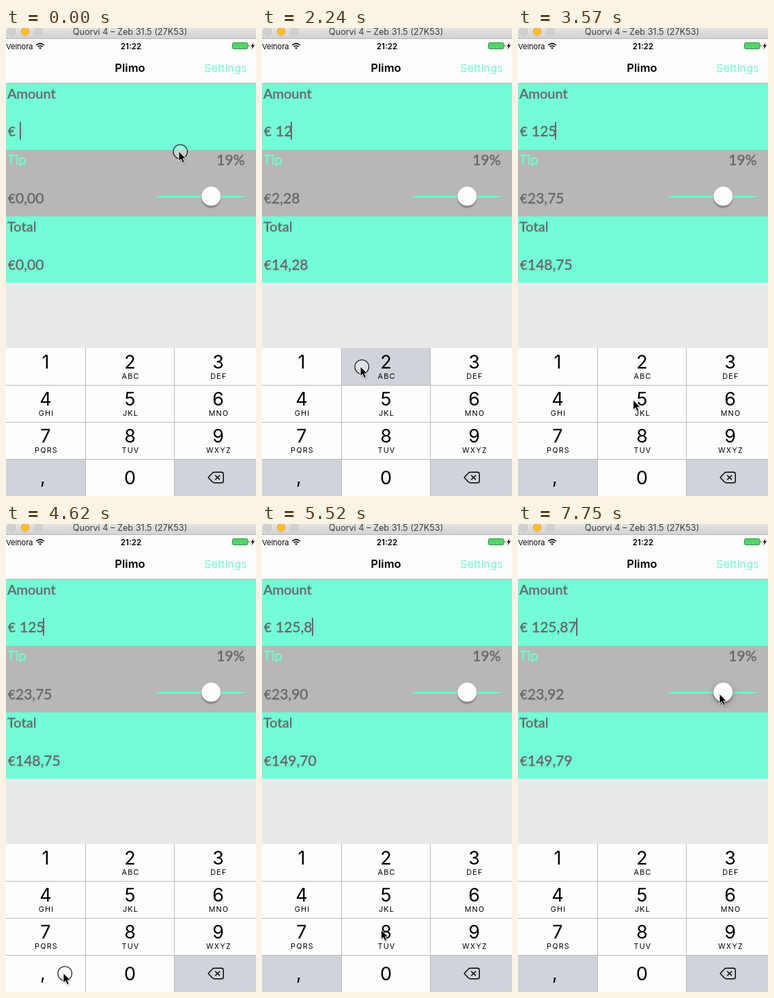
Write an HTML page that moves like this. It is 366 px wide and 683 px high and loops after 8 s.

```html
<!DOCTYPE html>
<html lang="en">
<head>
<meta charset="utf-8">
<title>Tip calculator</title>
<style>
  html, body { margin: 0; width: 100%; height: 100%; overflow: hidden; background: #e9e9e9; }
  svg { display: block; font-family: Inter, "Liberation Sans", sans-serif; }
  .form { font-family: Lato, "Open Sans", sans-serif; font-size: 21px; fill: #666; stroke: #666; stroke-width: .4; }
  .label { font-size: 20px; }
  .accent { fill: #73fcd6; stroke: #73fcd6; }
  .euro { font-size: 18.5px; }
  .digit { font-size: 27px; text-anchor: middle; }
  .letters { font-size: 10.8px; letter-spacing: 1.2px; text-anchor: middle; }
  .mid { text-anchor: middle; }
  .end { text-anchor: end; }
</style>
</head>
<body>
<svg id="stage" width="366" height="683" viewBox="0 0 366 683">
  <defs>
    <linearGradient id="chrome" x2="0" y2="1">
      <stop stop-color="#e4e4e4"/><stop offset="1" stop-color="#d2d2d2"/>
    </linearGradient>
    <filter id="soft" x="-50%" y="-50%" width="200%" height="200%"><feGaussianBlur stdDeviation="1.3"/></filter>
    <filter id="wide" x="-80%" y="-80%" width="260%" height="260%"><feGaussianBlur stdDeviation="4"/></filter>
  </defs>

  <!-- window bar -->
  <rect width="366" height="15" fill="url(#chrome)"/>
  <rect y="15" width="366" height="1" fill="#b3b3b3"/>
  <g stroke-width=".8">
    <circle cx="8" cy="5" r="5.8" fill="#d0d0d0" stroke="#bdbdbd"/>
    <circle cx="28" cy="5" r="5.8" fill="#fdbc2e" stroke="#e0a12b"/>
    <circle cx="47.5" cy="5" r="5.8" fill="#d0d0d0" stroke="#bdbdbd"/>
  </g>
  <text class="mid" x="181.5" y="10" font-size="12.7" fill="#3c3c3c">Quorvi 4 – Zeb 31.5 (27K53)</text>

  <!-- status and navigation -->
  <rect y="16" width="366" height="64" fill="#fdfdfd"/>
  <rect y="80" width="366" height="1" fill="#b5b5b5"/>
  <text x="0" y="30.5" font-size="11">Velnora</text>
  <g fill="none" stroke="#000" stroke-width="1.7">
    <path d="M44.3 25a8.2 8.2 0 0 1 11.4 0M46.6 27.4a4.9 4.9 0 0 1 6.8 0"/>
    <path d="M48.2 29.1a2.6 2.6 0 0 1 3.6 0L50 31Z" fill="#000" stroke="none"/>
  </g>
  <text class="mid" x="183" y="30.5" font-size="11.6" font-weight="600">21:22</text>
  <rect x="331.5" y="21.5" width="22.5" height="9" rx="2" fill="#4cd964" stroke="#3c7d48" stroke-width=".9"/>
  <path d="M355 24.2q1.6 1.8 0 3.6Z" fill="#333"/>
  <path d="M362.6 21l-4.4 5.8h2.6l-1.2 4.2 4.6-6h-2.7Z"/>
  <text class="mid" x="181.5" y="64" font-size="16.6" font-weight="600">Plimo</text>
  <text class="end" x="353" y="64" font-size="16.4" fill="#73fcd6">Settings</text>

  <!-- form -->
  <rect y="81" width="366" height="97" fill="#73fcd6"/>
  <rect y="178" width="366" height="97" fill="#b7b7b7"/>
  <rect y="275" width="366" height="97" fill="#73fcd6"/>
  <g class="form">
    <text class="label" x="2" y="102.7">Amount</text>
    <text class="euro" x="3" y="158">€</text>
    <text id="amount" x="20" y="158"></text>
    <text class="label accent" x="2" y="198.5">Tip</text>
    <text class="end" x="349.5" y="199.7">19%</text>
    <text class="euro" x="3" y="255.5">€</text>
    <text id="tip" x="14" y="255.5"></text>
    <text class="label" x="2" y="297.2">Total</text>
    <text class="euro" x="3" y="352.5">€</text>
    <text id="total" x="14" y="352.5"></text>
  </g>
  <rect id="caret" y="137" width="2" height="26" fill="#666"/>
  <rect x="221" y="245" width="128.5" height="2" rx="1" fill="#73fcd6"/>
  <circle id="glow" cx="300.3" cy="248" r="16" fill="#000" opacity=".14" filter="url(#wide)"/>
  <circle cx="300.3" cy="248.3" r="14" fill="#000" opacity=".32" filter="url(#soft)"/>
  <circle cx="300.3" cy="245.6" r="14" fill="#fdfdfd"/>

  <!-- keypad -->
  <g id="keys"></g>
  <path d="M116.5 467V683M246.5 467V683M0 521.5H366M0 575.5H366M0 629.5H366" stroke="#b6b8bb" fill="none"/>
  <g id="caps"></g>
  <path d="M296 656l6.2-6.6q1.2-1.2 2.8-1.2h10.5q2.8 0 2.8 2.8v10q0 2.8-2.8 2.8H305q-1.6 0-2.8-1.2ZM306.3 652.7l6.6 6.6m0-6.6l-6.6 6.6"
        fill="none" stroke="#000" stroke-width="1.4" stroke-linejoin="round"/>

  <!-- pointer -->
  <g id="pointer">
    <circle id="ring" cx="2.2" cy="0.5" r="10.3" fill="#fff" fill-opacity=".3" stroke="#111" stroke-width="1.1"/>
    <path d="M1 2v14l3.2-3 2.4 5.4 2.6-1.1-2.4-5.3h4.6Z" fill="#000" opacity=".3" filter="url(#soft)"/>
    <path d="M0 0v14.2l3.2-3 2.4 5.6 2.7-1.2-2.4-5.3h4.5Z" fill="#000" stroke="#fff" stroke-width=".9"/>
  </g>
</svg>
<script>
const LOOP = 8000, TICK = 149, LAST = 52;
const WHITE = '#fdfdfd', GREY = '#d0d4da';
const $ = id => document.getElementById(id);

// Keypad
const colX = [0, 116.5, 246.5, 366], capX = [58, 181.5, 310.5];
const names = ['1', '2', '3', '4', '5', '6', '7', '8', '9', ',', '0', 'del'];
const letters = ['', 'ABC', 'DEF', 'GHI', 'JKL', 'MNO', 'PQRS', 'TUV', 'WXYZ'];
const keys = {};

function add(parent, tag, attrs, text) {
  const el = document.createElementNS('http://www.w3.org/2000/svg', tag);
  for (const name in attrs) el.setAttribute(name, attrs[name]);
  if (text) el.textContent = text;
  return parent.appendChild(el);
}

names.forEach((name, i) => {
  const col = i % 3, row = Math.floor(i / 3), top = 467 + row * 54;
  const base = name === ',' || name === 'del' ? GREY : WHITE;
  const el = add($('keys'), 'rect', { x: colX[col], y: top, width: colX[col + 1] - colX[col], height: 54.5 });
  keys[name] = { el, base, pressed: base === GREY ? WHITE : GREY };
  if (name === 'del') return;
  const [x, y] = name === ',' ? [54, 664.5] : [capX[col], top + (row < 3 ? 30 : 37)];
  add($('caps'), 'text', { class: 'digit', x, y }, name);
  if (letters[i]) add($('caps'), 'text', { class: 'letters', x: x + 1, y: top + 45 }, letters[i]);
});

// All times below are in ticks.
const path = [
  [1, 253, 180], [6, 56, 556], [7, 48, 492], [10, 48, 492], [14, 144, 494],
  [16, 144, 494], [18, 168.7, 543], [25, 168.7, 543], [30, 84, 655.5], [32, 84, 655.5],
  [34, 174.4, 592], [37, 174.4, 592], [39, 58, 604], [47, 58, 604], [52, 295, 248]
];
const presses = [['1', 8, 9], ['2', 14, 16], ['5', 22, 24], [',', 30, 32], ['8', 36, 37], ['7', 43, 44]];
const typed = '125,87', typedAt = [9, 15, 23, 32, 37, 44];
const caretOff = [[3, 6], [13, 15], [20, 22], [28, 30], [36, 37], [41, 44], [48, 51]];

const within = (n, from, to) => n >= from && n < to;
const money = v => v.toFixed(2).replace('.', ',');

function pointerAt(n) {
  if (n <= path[0][0]) return path[0].slice(1);
  const i = path.findIndex(p => p[0] >= n);
  const [n0, x0, y0] = path[i - 1], [n1, x1, y1] = path[i];
  const u = (n - n0) / (n1 - n0), e = u * u * (3 - 2 * u);
  return [x0 + (x1 - x0) * e, y0 + (y1 - y0) * e];
}

function draw(ms) {
  const n = Math.min(LAST, Math.floor((ms + 8) / TICK));

  const entry = typed.slice(0, typedAt.filter(at => n >= at).length);
  const value = parseFloat(entry.replace(',', '.')) || 0;
  $('amount').textContent = entry;
  $('tip').textContent = money(value * 0.19);
  $('total').textContent = money(value * 1.19);

  const caretX = entry ? 18.9 + 12.2 * entry.length - (entry.includes(',') ? 5.8 : 0) : 21;
  $('caret').setAttribute('x', Math.round(caretX) - 1);
  $('caret').style.display = caretOff.some(([a, b]) => within(n, a, b)) ? 'none' : '';

  const press = presses.find(([, a, b]) => within(n, a, b));
  for (const name in keys) {
    const key = keys[name];
    key.el.setAttribute('fill', press && press[0] === name ? key.pressed : key.base);
  }
  $('ring').style.display = press || n === 0 ? '' : 'none';
  $('glow').style.display = n === LAST ? '' : 'none';
  $('pointer').setAttribute('transform', `translate(${pointerAt(n)})`);
}

const start = performance.now();
function loop() {
  draw((performance.now() - start) % LOOP);
  requestAnimationFrame(loop);
}
loop();
</script>
</body>
</html>
```
